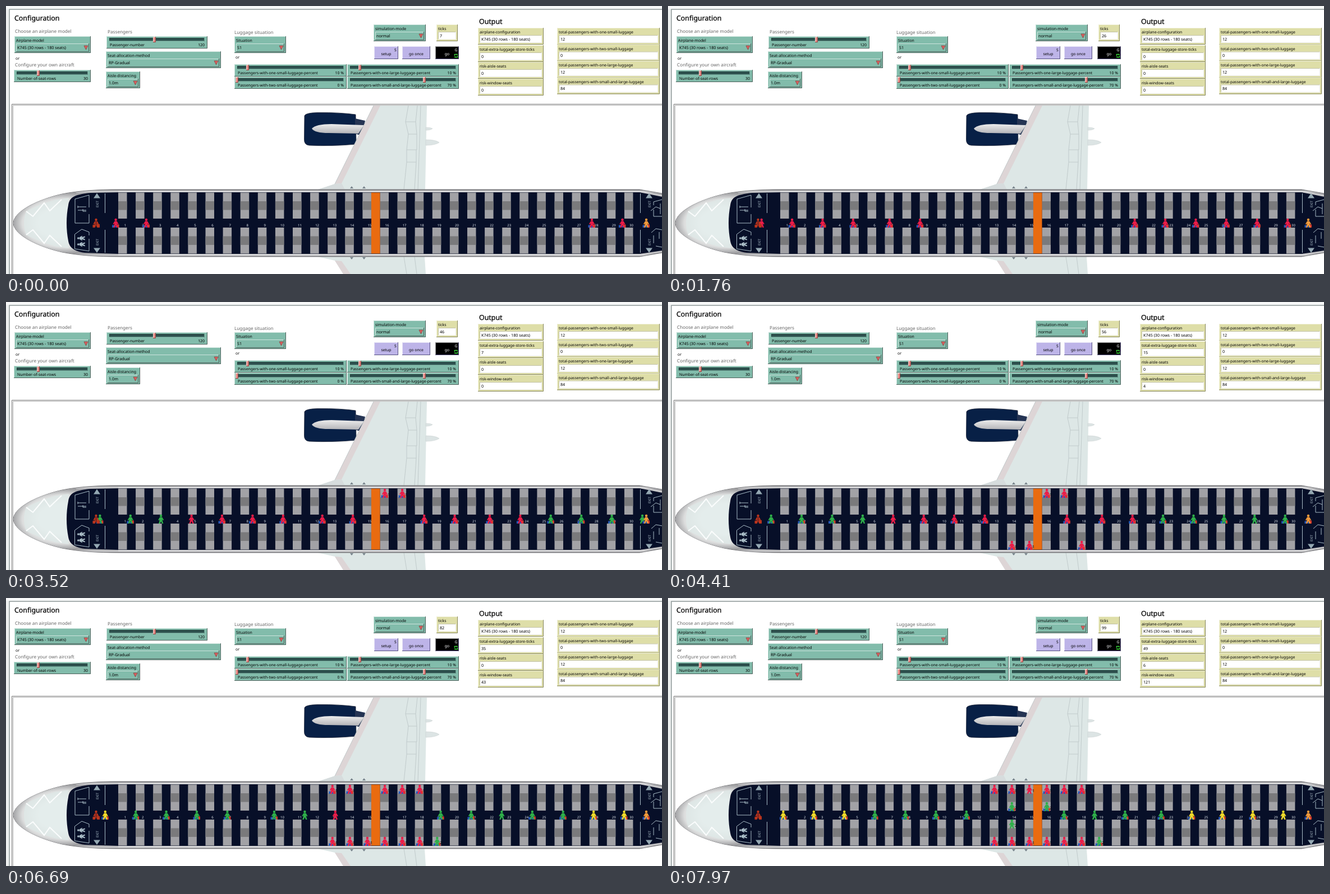
Write an HTML page that moves like this. It is 1169 px wide and 479 px high and loops after 8 s.

```html
<!DOCTYPE html>
<html lang="en">
<head>
<meta charset="utf-8">
<title>Airplane boarding simulation</title>
<style>
html, body { margin: 0; width: 100%; height: 100%; overflow: hidden; background: #fff; }
svg { display: block; width: 1169px; height: 479px; }
text { font: 6.9px "Noto Sans", "Open Sans", sans-serif; text-rendering: geometricPrecision; white-space: pre; }
.title { font-size: 12.4px; stroke: #000; stroke-width: .25px; }
.note { font-size: 8.2px; fill: #666; }
.value { font-size: 7.2px; }
.mid { text-anchor: middle; }
.end { text-anchor: end; }
.row { font-size: 6px; fill: #dfe4ea; text-anchor: middle; }
.exit { font-size: 6px; fill: #a9bcc6; text-anchor: middle; }
.sign { fill: none; stroke: #a9bcc6; }
.seam { fill: none; stroke: #b9c3c4; stroke-width: .8; }
</style>
</head>
<body>
<svg viewBox="0 0 1169 479">
  <defs>
    <linearGradient id="hull" x2="0" y2="1">
      <stop offset="0" stop-color="#6f6f72"/>
      <stop offset=".025" stop-color="#d2d2d4"/>
      <stop offset=".06" stop-color="#a5a5a8"/>
      <stop offset=".2" stop-color="#dcdcde"/>
      <stop offset=".45" stop-color="#f4f4f4"/>
      <stop offset=".75" stop-color="#dededf"/>
      <stop offset=".95" stop-color="#9b9b9e"/>
      <stop offset=".98" stop-color="#d2d2d4"/>
      <stop offset="1" stop-color="#6f6f72"/>
    </linearGradient>
    <radialGradient id="nose" gradientUnits="userSpaceOnUse" cx="0" cy="0" r="1" gradientTransform="translate(105 388) scale(95 55)">
      <stop offset=".5" stop-color="#f3f5f5"/>
      <stop offset=".8" stop-color="#dcdddd"/>
      <stop offset="1" stop-color="#98989b"/>
    </radialGradient>
    <linearGradient id="nozzle" x2="0" y2="1">
      <stop offset="0" stop-color="#ececec"/>
      <stop offset="1" stop-color="#b4b4b8"/>
    </linearGradient>
    <g id="person" fill="currentColor">
      <circle cy="-6" r="2.2"/>
      <path d="M-2-3.6H2L5 1.6 3.8 2.6 2.2.4 2.6 3 4.2 8H1.8L0 3.8-1.8 8H-4.2L-2.6 3-2.2.4-3.8 2.6-5 1.6Z"/>
    </g>
    <g id="bags">
      <path d="M-6.5 3.5H-2V8H-6.5ZM-1 5H1.6V8H-1Z" fill="#2858b8"/>
      <path d="M2 2.5H6V8H2Z" fill="#d8392c"/>
    </g>
    <g id="door">
      <path d="M-6 343.500H6L0 334.500ZM-6 432.500H6L0 441Z" fill="#94a8b2"/>
      <text class="exit" transform="translate(2.500 354) rotate(-90)">EXIT</text>
      <text class="exit" transform="translate(2.500 422) rotate(-90)">EXIT</text>
    </g>
  </defs>

  <path d="M0 0H5V479H0Z" fill="#edf0f0"/>
  <path d="M0 0H1169V5H0Z" fill="#f7f8f8"/>
  <path d="M1169 6H6V479" fill="none" stroke="#8c9696" stroke-width="1.500"/>
  <path d="M1169 175.500H10.500V479" fill="none" stroke="#777"/>
  <path d="M1169 177.500H12.500V479" fill="none" stroke="#aaa"/>

  <!-- wings and engine -->
  <path d="M532 196Q534 191 555 190.500 595 190 623 194L624 247Q580 251 540 249 531 248 531.500 238Z" fill="#082046" stroke="#1c2334" stroke-width=".8"/>
  <path d="M622 201 640 205 634 232 622 228Z" fill="#253453"/>
  <path d="M545 219Q552 211 580 211L638 213 628 228 575 227Q550 227 545 219Z" fill="url(#nozzle)"/>
  <path d="M655 178H750L747 328H556L586 318Z" fill="#dde7e6"/>
  <path d="M655 178H667L598 317 586 318Z" fill="#ddd5d6"/>
  <path d="M586 318 598 317 604 328H556Z" fill="#d6dcdd"/>
  <path d="M555 448H746L748 479H601L586 455Z" fill="#dde7e6"/>
  <path d="M586 455 598 456 614 479H601Z" fill="#ddd5d6"/>
  <path d="M748 217Q757 217 760 219 757 222 748 222ZM748 239Q766 239 772 244 764 249 748 249Z" fill="#dce4e4" stroke="#cbd2d2" stroke-width=".6"/>
  <path class="seam" d="M717 178 712 207H730L733 178M712 207 717 229H732L730 207M717 229 714 257H732V229M714 257V279H731V257M714 279 709 328M731 279 728 328M739 178 734 328M709 448 714 479M728 448 732 479M655 178 586 318"/>
  <path d="M613 326 616 322 619 326ZM635 326 638 322 641 326ZM613 449H619L616 453ZM635 449H641L638 453Z" fill="#77838b"/>

  <!-- fuselage -->
  <path d="M13 388C14 366 60 345 100 336 130 330 165 328 200 328H1129L1169 335V441L1129 448H200C165 448 130 446 100 440 60 431 14 410 13 388Z" fill="url(#hull)" stroke="#77777a"/>
  <path d="M13.500 388C14 366 60 345 100 336L125 333V443L100 440C60 431 14 410 13.500 388Z" fill="url(#nose)"/>
  <path d="M36 367Q60 354 86 347L112 343Q104 388 112 433L86 429Q60 422 36 409 28 388 36 367Z" fill="#dfeae9" opacity=".7"/>
  <path d="M36 367 48 376 68 352 78 366 99 346M36 409 48 400 68 424 78 410 99 430" fill="none" stroke="#fbfdfd" stroke-width="2"/>
  <path d="M200 333H1129L1169 341V437L1129 443H200L140 441C120 438 113 431 111 420 107 400 107 376 111 356 113 343 120 337 150 334Z" fill="#070f28"/>
  <path d="M200 331.500H1129L1169 339M200 444.500H1129L1169 439" fill="none" stroke="#ececee"/>
  <g id="rows"></g>
  <path d="M651 333.500H666.500V442.500H651Z" fill="#e96b10"/>
  <g class="sign">
    <path d="M148 372V388H123V345L148 338V360M122.500 408V434L148 438V416M122.500 408 135 399 148 404V410M176.500 335V370M176.500 400V441M1130.500 335V370M1130.500 400V441"/>
    <path d="M128 359H143M128 365H143M128 357V361M137 363V367H143"/>
    <path d="M1169 346 1154 350V356M1154 364V376H1169M1149 366 1158 359 1166 362M1150 405 1158 398 1169 400M1154 410V424M1169 431 1158 429M1166 353V372M1164 404V416"/>
  </g>
  <g color="#a9bcc6">
    <use href="#person" transform="translate(134 415) rotate(-90) scale(.85)"/>
    <use href="#person" transform="translate(134 426) rotate(-90) scale(.85)"/>
  </g>
  <use href="#door" x="162"/>
  <use href="#door" x="1146"/>

  <g id="agents"></g>
  <g color="#ba341d">
    <use href="#person" x="160.500" y="388"/>
    <path d="M154.500 391H158V396H154.500ZM163 390H167V396H163Z" fill="#ba341d"/>
    <path d="M160.500 385V392" stroke="#3a1420"/>
  </g>
  <g color="#f39a3c">
    <use href="#bags" x="1141" y="388"/>
    <use href="#person" x="1141" y="388"/>
  </g>
  <g id="panel"></g>
</svg>

<script>
const LOOP = 8000;
const REFRESH = 57;
const TEAL = '#82bcab', BEIGE = '#dedea8', LILAC = '#bdb4e8';
const $ = id => document.getElementById(id);
const panel = [];

// ---- control panel ----
const text = (x, y, s, cls = '', extra = '') =>
  panel.push(`<text x="${x}" y="${y}" class="${cls}" ${extra}>${s}</text>`);

function box(x, y, w, h, fill, light = '#fff', dark = '#4d5f5a') {
  panel.push(`<path d="M${x} ${y}h${w}v${h}h${-w}z" fill="${fill}"/>
    <path d="M${x + .5} ${y + h}V${y + .5}H${x + w}" fill="none" stroke="${light}" stroke-opacity=".6"/>
    <path d="M${x} ${y + h - .5}H${x + w - .5}V${y}" fill="none" stroke="${dark}"/>`);
}

function chooser(x, y, w, label, value) {
  box(x, y, w, 30, TEAL);
  text(x + 3, y + 10, label);
  box(x + 3, y + 13, w - 6, 15, TEAL);
  text(x + 5, y + 23, value, 'value');
  panel.push(`<path d="M${x + w - 12} ${y + 17}h7l-3.500 7z" fill="#d9605f" stroke="#7c3a3a" stroke-width=".7"/>`);
}

function slider(x, y, w, handle, label, value) {
  box(x, y, w, 22, TEAL);
  box(x + 5, y + 3, w - 10, 6, '#2d504d', '#1c3331', '#6b9a8e');
  box(handle - 2, y + 1, 5, 10, '#e58b86', '#fff', '#8f4341');
  text(x + 6, y + 17.500, label);
  text(x + w - 5, y + 17.500, value, 'end');
}

function monitor(x, y, w, label, value, id) {
  box(x, y, w, 30, BEIGE, '#fff', '#85855a');
  text(x + 3, y + 10, label);
  box(x + 3, y + 13, w - 6, 14, '#fff', '#99996c', '#eee');
  text(x + 6, y + 22.500, value, 'value', id ? `id="${id}"` : '');
}

function button(x, w, label, key, fill, ink) {
  box(x, 72, w, 23, fill, '#fff', '#555080');
  text(x + w / 2, 88, label, 'mid', `fill="${ink}"`);
  text(x + w - 5, 81, key, 'mid', `fill="${ink}"`);
}

text(15, 26, 'Configuration', 'title');
text(843, 32, 'Output', 'title');
text(16, 48, 'Choose an airplane model', 'note');
text(16, 108, 'Configure your own aircraft', 'note');
text(181, 49, 'Passengers', 'note');
text(407, 50, 'Luggage situation', 'note');
text(17, 96, 'or');
text(409, 94, 'or');
chooser(15, 54, 136, 'Airplane-model', 'K745 (30 rows - 180 seats)');
chooser(178, 81, 205, 'Seat-allocation-method', 'RP-Gradual');
chooser(178, 117, 61, 'Aisle-distancing', '1.0m');
chooser(407, 54, 92, 'Situation', 'S1');
chooser(655, 33, 93, 'simulation-mode', 'normal');
slider(14, 114, 137, 57, 'Number-of-seat-rows', '30');
slider(179, 54, 180, 264, 'Passenger-number', '120');
slider(407, 104, 200, 430, 'Passengers-with-one-small-luggage-percent', '10 %');
slider(608, 104, 199, 630, 'Passengers-with-one-large-luggage-percent', '10 %');
slider(407, 126, 200, 411, 'Passengers-with-two-small-luggage-percent', '0 %');
slider(608, 126, 199, 745, 'Passengers-with-small-and-large-luggage-percent', '70 %');
button(656, 43, 'setup', 'S', LILAC, '#000');
button(706, 50, 'go once', '', LILAC, '#000');
button(765, 42, 'go', 'G', '#000', '#fff');
panel.push('<path d="M799.500 89V86.500H804V88M804.500 89V91.500H800V90" fill="none" stroke="#39d23b" stroke-width="1.500"/>');
monitor(767, 33, 38, 'ticks', 7, 'ticks');
monitor(841, 39, 117, 'airplane-configuration', 'K745 (30 rows - 180 seats)');
monitor(841, 70, 117, 'total-extra-luggage-store-ticks', 0, 'extra');
monitor(841, 100, 117, 'risk-aisle-seats', 0, 'aisle');
monitor(841, 130, 117, 'risk-window-seats', 0, 'window');
['one-small', 'two-small', 'one-large', 'small-and-large'].forEach((kind, i) =>
  monitor(982, 39 + i * 29.500, 183, `total-passengers-with-${kind}-luggage`, [12, 0, 12, 84][i]));
$('panel').innerHTML = panel.join('');

// ---- cabin rows ----
const rowX = n => 200 + 31.1 * (n - 1);
let rows = '';
for (let n = 1; n <= 30; n++) {
  const x = rowX(n);
  rows += `<path d="M${x} 333.500h15.500v46.500h-15.500zM${x} 396h15.500v46.500h-15.500z" fill="#a2a2a6"/>
    <path d="M${x} 349h15.500v15.500h-15.500zM${x} 411.500h15.500v15.500h-15.500z" fill="#7a7a7c"/>
    <text class="row" x="${x + 12.500}" y="393.500">${n}</text>`;
}
$('rows').innerHTML = rows;

// ---- motion ----
// Linear interpolation through [input, value] points, held at both ends.
function at(points, t) {
  if (t <= points[0][0]) return points[0][1];
  for (let i = 1; i < points.length; i++) {
    const [t0, v0] = points[i - 1], [t1, v1] = points[i];
    if (t < t1) return v0 + (v1 - v0) * (t - t0) / (t1 - t0);
  }
  return points[points.length - 1][1];
}

const MARKS = [0, 1760, 2680, 4410, 5620, 6690, 7970];
const through = values => values.map((v, i) => [MARKS[i], v]);
const TICKS = through([7, 26, 37, 56, 69, 82, 99]);
const WINDOW_RISK = [[52, 0], [56, 4], [69, 27], [82, 43], [99, 121]];

// The head of each queue follows a path and the others trail it at a fixed gap.
// A rush lets some passengers close up: [first, last, begin, end, pixels].
const GAP = 54.4, STOW = 130;
const QUEUES = [{
  dir: 1, door: 160, size: 16, noBags: [5, 6],
  path: through([250, 438, 532, 675, 759, 831, 967]),
  rushes: [[0, 1, 0, 2600, 15.5], [5, 7, 5620, 7130, 42]],
  seats: '15F 14F 13A 14A 13F 15A 14D 14C'
}, {
  dir: -1, door: 1141, size: 17, noBags: [9, 15],
  path: through([1044, 833, 733, 553.5, 457.5, 393, 280.5]),
  rushes: [[0, 3, 1700, 2680, 8], [7, 10, 6600, 7970, 10]],
  seats: '16A 17A 18F 16F 17F 18A 19F 16C'
}];

function seatAt(code) {
  if (!code) return null;
  const column = 'ABCDEF'.indexOf(code.slice(-1));
  const aisle = column > 2 ? 1 : 0;
  return { x: rowX(parseInt(code)) + 8.5, y: 342 + 15.5 * (column + aisle) };
}

function walk({ dir, path, rushes }, i, t) {
  let x = at(path, t) - dir * GAP * i;
  for (const [first, last, begin, end, px] of rushes)
    if (i >= first && i <= last) x += dir * at([[begin, 0], [end, px]], t);
  return x;
}

// Passengers sit down a moment after reaching their row.
function sitTime(queue, i, seat) {
  let t = 0;
  while (t < LOOP && queue.dir * (walk(queue, i, t) - seat.x) < 0) t += 5;
  return t + STOW;
}

const COLORS = ['#ec1c48', '#2fb04a', '#f5dc2a'];
const agents = QUEUES.flatMap(queue => Array.from({ length: queue.size }, (_, i) => {
  const group = Math.floor(i / 6);
  const bags = queue.noBags.includes(i) ? '' : '<use href="#bags"/>';
  $('agents').insertAdjacentHTML('beforeend',
    `<g color="${COLORS[group]}">${bags}<use href="#person"/><text x="5" y="5" font-weight="bold">${group + 1}</text></g>`);
  const el = $('agents').lastElementChild;
  const seat = seatAt(queue.seats.split(' ')[i]);
  return { queue, i, el, seat, sits: seat ? sitTime(queue, i, seat) : Infinity, label: el.querySelector('text') };
}));

function place({ queue, i, el, seat, sits, label }, t) {
  const { dir, door } = queue;
  const seated = t >= sits;
  let x = walk(queue, i, t);
  const visible = dir * (x - door) >= 0;
  if (seated) x = seat.x;
  else if (seat) x = dir * Math.min(dir * x, dir * seat.x + 8);
  el.setAttribute('transform', `translate(${x.toFixed(1)} ${seated ? seat.y : 388})`);
  el.style.display = visible ? '' : 'none';
  label.style.display = seated ? '' : 'none';
}

function draw(now) {
  const t = Math.round(now % LOOP / REFRESH) * REFRESH;
  const ticks = Math.round(at(TICKS, t));
  $('ticks').textContent = ticks;
  $('extra').textContent = Math.floor(Math.max(0, ticks - 37) * .791);
  $('aisle').textContent = Math.max(0, ticks - 93);
  $('window').textContent = Math.round(at(WINDOW_RISK, ticks));
  agents.forEach(agent => place(agent, t));
}

const start = performance.now();
function frame() {
  draw(performance.now() - start);
  requestAnimationFrame(frame);
}
frame();
</script>
</body>
</html>
```
